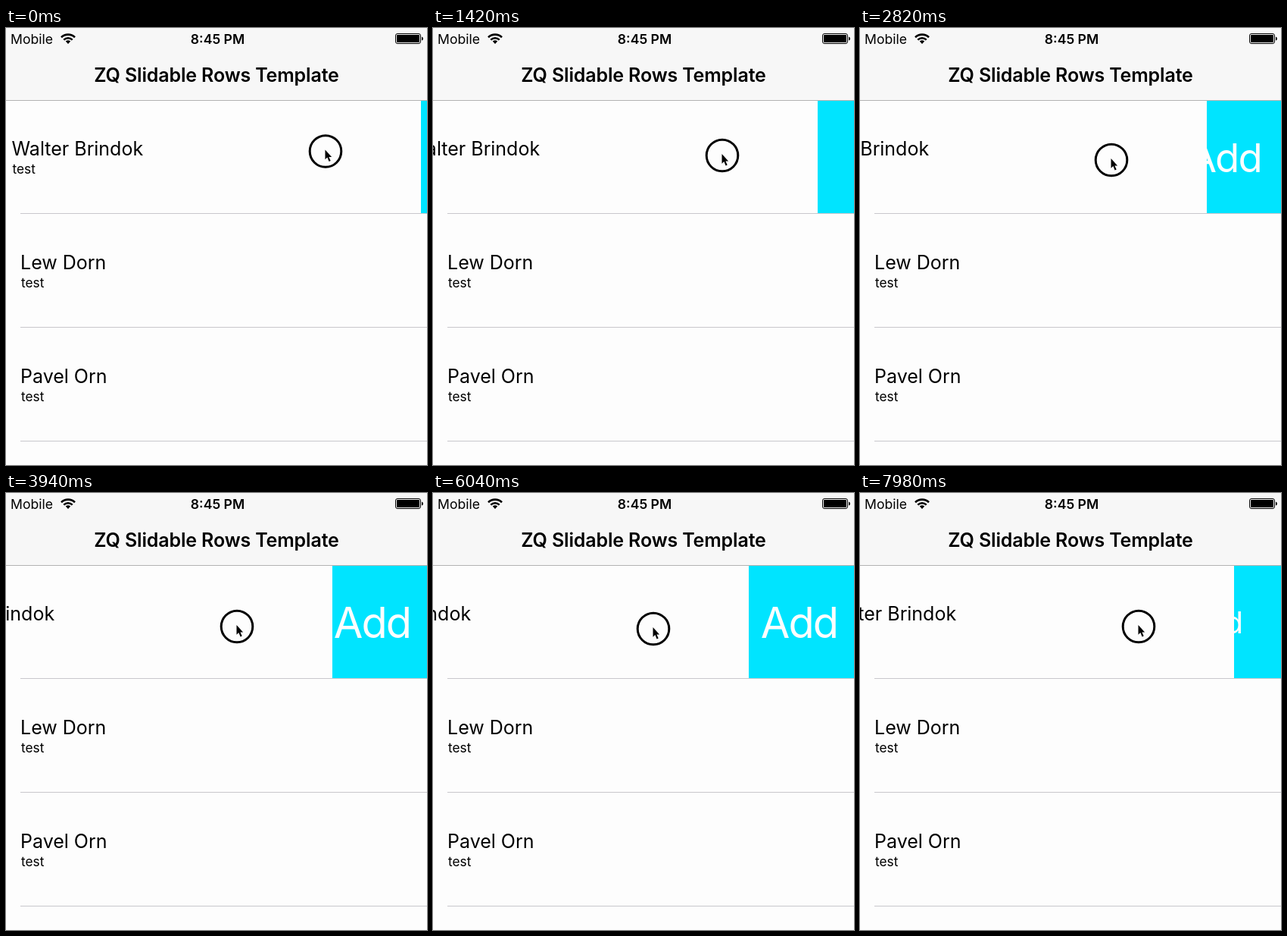
An HTML page for the animation above (8000 ms loop, 556 by 576 pixels).

```html
<!DOCTYPE html>
<html lang="en">
<head>
<meta charset="utf-8">
<title>Swipe row</title>
<style>
  html, body { margin: 0; width: 100%; height: 100%; overflow: hidden; background: #fdfdfd; }
  svg { display: block; width: 556px; height: 576px; }
  text { font-family: Inter, Roboto, sans-serif; fill: #000; }
  .name { font-size: 25px; }
  .note { font-size: 17.3px; }
  .status { font-size: 17.6px; }
  .bold { font-weight: 600; text-anchor: middle; }
  .title { font-size: 25px; letter-spacing: -.15px; }
  .add { font-size: 56px; letter-spacing: -2px; text-anchor: end; fill: #fdfdfd; }
  .line { fill: #c8c7cc; }
</style>
</head>
<body>
<svg viewBox="0 0 556 576">
  <defs><clipPath id="clip"><rect id="clipBox" y="96" width="556" height="148"/></clipPath></defs>
  <rect width="556" height="576" fill="#fdfdfd"/>

  <g id="cell">
    <text class="name" y="168">Walter Brindok</text>
    <text class="note" x="1" y="192">test</text>
  </g>
  <text class="name" x="19" y="318">Lew Dorn</text>
  <text class="note" x="20" y="342">test</text>
  <text class="name" x="19" y="468">Pavel Orn</text>
  <text class="note" x="20" y="492">test</text>

  <g clip-path="url(#clip)">
    <rect y="96" width="556" height="148" fill="#00e4ff"/>
    <g id="label"><text class="add" x="2" y="20">Add</text></g>
  </g>
  <rect class="line" x="19" y="244" width="537" height="1"/>
  <rect class="line" x="19" y="394" width="537" height="1"/>
  <rect class="line" x="19" y="544" width="537" height="1"/>

  <rect width="556" height="95" fill="#f7f7f7"/>
  <rect y="95" width="556" height="1" fill="#b2b2b2"/>
  <text class="status" x="6" y="20.5">Mobile</text>
  <g fill="none" stroke="#000" stroke-width="2.6">
    <path d="M73 12.2a13 13 0 0 1 18 0M76.3 15.6a8.2 8.2 0 0 1 11.4 0"/>
    <path d="M82 21l-3.2-3.4a4.6 4.6 0 0 1 6.4 0z" fill="#000" stroke="none"/>
  </g>
  <text class="status bold" x="279.5" y="20.5">8:45 PM</text>
  <rect x="514.5" y="7.5" width="33" height="13" rx="2.5" fill="none" stroke="#000"/>
  <rect x="516" y="9" width="30" height="10" rx="1" fill="#000"/>
  <path d="M549 11.5q2 .5 2 2.5t-2 2.5z" fill="#000"/>
  <text class="title bold" x="278" y="71">ZQ Slidable Rows Template</text>

  <g id="pointer">
    <circle r="20.8" fill="none" stroke="#000" stroke-width="3"/>
    <path transform="translate(-.5 -2) scale(.88)" d="M0 0v14.5l3.2-3 2.6 6 2.4-1-2.6-5.8h4.2z" fill="#000" stroke="#fff" paint-order="stroke"/>
  </g>
</svg>
<script>
  const LOOP = 8000;
  // time, left edge of the button, height of the pointer
  const keys = [
    [0, 548, 162.5], [1420, 508, 168], [2820, 458, 174], [3940, 431, 176],
    [5000, 410, 179], [6040, 417, 179], [7120, 462, 176], [7980, 494, 176]
  ];
  const $ = id => document.getElementById(id);
  const place = (id, value) => $(id).setAttribute("transform", value);

  function slope(i, col) {
    const a = keys[Math.max(i - 1, 0)], b = keys[Math.min(i + 1, keys.length - 1)];
    return (b[col] - a[col]) / (b[0] - a[0]);
  }

  // cubic Hermite curve through the keys
  function at(time, col) {
    const t = Math.min(time, 7980);
    let i = 0;
    while (i < keys.length - 2 && t >= keys[i + 1][0]) i++;
    const a = keys[i], b = keys[i + 1], span = b[0] - a[0];
    const u = (t - a[0]) / span, v = 1 - u;
    return a[col] * v * v * (1 + 2 * u) + b[col] * u * u * (1 + 2 * v)
      + span * u * v * (slope(i, col) * v - slope(i + 1, col) * u);
  }

  function draw(time) {
    const edge = Math.round(at(time, 1));
    const y = Math.round(at(time, 2) * 2) / 2;
    // the label shrinks and slides left while the button is narrow
    const missing = Math.max(0, 107 - (556 - edge));
    const scale = 1 - missing * .0065;
    const right = 532 - missing * (.39 + missing * .0056);
    $("clipBox").setAttribute("x", edge);
    place("cell", `translate(${edge - 540.5} 0)`);
    place("label", `translate(${right} 171) scale(${scale})`);
    place("pointer", `translate(${edge - 126} ${y})`);
  }

  const start = performance.now();
  function tick() {
    draw((performance.now() - start) % LOOP);
    requestAnimationFrame(tick);
  }
  tick();
</script>
</body>
</html>
```
